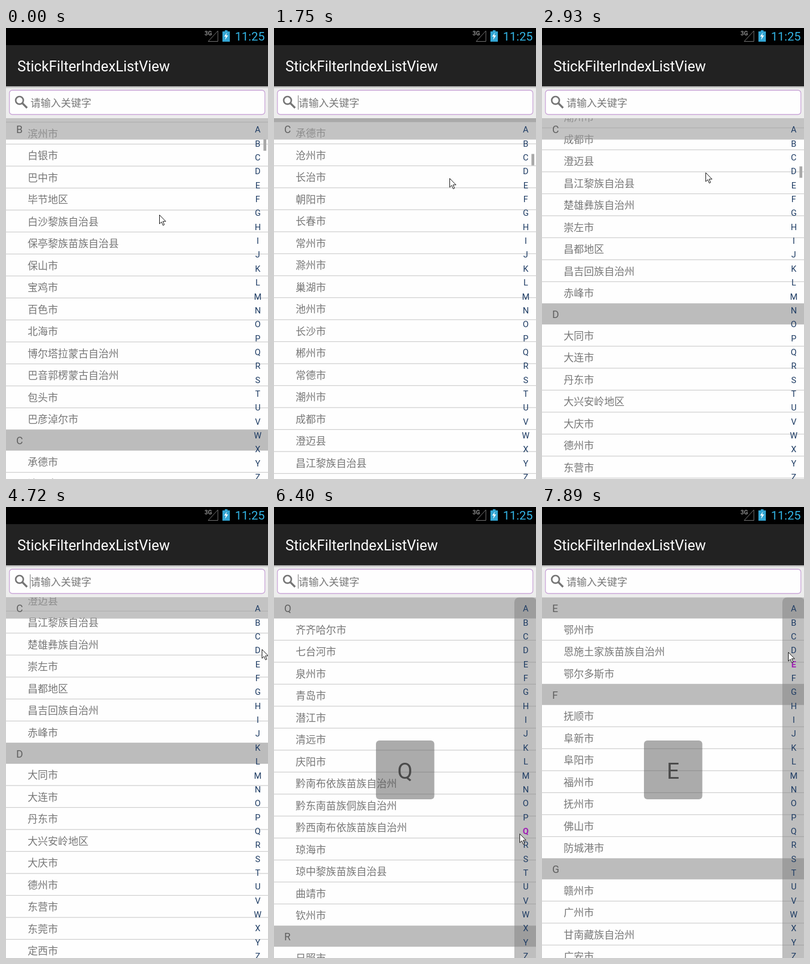
Recreate the animation shown at these times as an HTML page. Size 460 by 790 pixels, loop 8000 ms.

```html
<!DOCTYPE html>
<html lang="zh-CN">
<head>
<meta charset="utf-8">
<style>
html, body { margin: 0; width: 100%; height: 100%; overflow: hidden; background: #fefefe; }
svg { display: block; width: 460px; height: 790px; font-family: Roboto, "Noto Sans CJK SC", "Noto Sans CJK", sans-serif; }
.city { font: 17.8px "Noto Sans CJK SC", "Noto Sans CJK", sans-serif; fill: #777; }
.head { font-size: 18px; fill: #5f5f5f; }
.index { font-size: 15px; fill: #1d3b63; text-anchor: middle; }
.index .on { fill: #a01fb4; font-weight: 700; }
</style>
</head>
<body>
<svg viewBox="0 0 460 790">
  <defs>
    <linearGradient id="shade" x2="0" y2="1">
      <stop stop-color="#aaa"/><stop offset="1" stop-color="#ededed"/>
    </linearGradient>
    <clipPath id="listArea"><path d="M0 158H460V790H0z"/></clipPath>
  </defs>
  <rect width="460" height="790" fill="#fefefe"/>
  <g clip-path="url(#listArea)">
    <g id="list"></g>
    <g id="sticky">
      <rect y="158" width="460" height="37.5" fill="#9d9d9d" fill-opacity=".6"/>
      <text id="stickyText" class="head" x="18" y="184"></text>
    </g>
  </g>
  <rect id="thumb" x="452" width="5" height="20" fill="#aaa"/>
  <rect id="bar" x="422" y="158.5" width="39" height="650" rx="8" fill="#808080" fill-opacity=".5"/>
  <g id="index" class="index"></g>
  <g id="popup">
    <rect x="179" y="409" width="102.5" height="103" rx="6" fill="#5a5a5a" fill-opacity=".5"/>
    <text id="popupText" x="230" y="475.5" font-size="39" fill="#4a4a4a" text-anchor="middle"></text>
  </g>

  <rect width="460" height="30"/>
  <text x="348.500" y="13" font-size="10.500" font-weight="700" fill="#8a8a8a">3G</text>
  <path d="M372 5V23.500H355z" fill="none" stroke="#777"/>
  <path d="M384 4h5v2h4v18h-13V6h4z" fill="#33a5d3"/>
  <path d="M388 8l-5 7h3l-1.500 6 5.500-8h-3.500z" fill="#fff"/>
  <text x="402" y="22" font-size="21" fill="#33b5e5">11:25</text>
  <rect y="30" width="460" height="72" fill="#222"/>
  <text x="20" y="76" font-size="25.200" fill="#fff">StickFilterIndexListView</text>
  <rect y="102" width="460" height="56" fill="#ededed"/>
  <rect y="102" width="460" height="4" fill="url(#shade)"/>
  <rect x="6" y="109" width="448.500" height="42.500" rx="5" fill="#fefefe" stroke="#c8a3d6" stroke-width="1.300"/>
  <g fill="none" stroke="#757575">
    <circle cx="23.700" cy="126.700" r="6.700" stroke-width="2.700"/>
    <path d="M28.500 131.500L37 140" stroke-width="3.300"/>
  </g>
  <text class="city" x="43" y="137.500">请输入关键字</text>
  <path id="caret" d="M42.500 118V143" stroke="#777"/>
  <path id="mouse" d="M.5 .5V16L4 12.700 6.600 18.700 9 17.600 6.400 11.800H11.500z" fill="#fff" stroke="#111"/>
</svg>
<script>
const LOOP = 8000, TOP = 158, HEAD = 37, ROW = 38.5, CELL = 24.36;

// Names without a longer suffix get 市 appended.
const cities = {
  B: '保定 本溪 白山 白城 蚌埠 亳州 滨州 白银 巴中 毕节地区 白沙黎族自治县 保亭黎族苗族自治县 保山 宝鸡 百色 北海 博尔塔拉蒙古自治州 巴音郭楞蒙古自治州 包头 巴彦淖尔',
  C: '承德 沧州 长治 朝阳 长春 常州 滁州 巢湖 池州 长沙 郴州 常德 潮州 成都 澄迈县 昌江黎族自治县 楚雄彝族自治州 崇左 昌都地区 昌吉回族自治州 赤峰',
  D: '大同 大连 丹东 大兴安岭地区 大庆 德州 东营 东莞 定西 德阳 达州 东方 定安县 儋州 大理白族自治州 德宏傣族景颇族自治州 迪庆藏族自治州',
  E: '鄂州 恩施土家族苗族自治州 鄂尔多斯',
  F: '抚顺 阜新 阜阳 福州 抚州 佛山 防城港',
  G: '赣州 广州 甘南藏族自治州 广安 甘孜藏族自治州 广元 贵阳 果洛藏族自治州 桂林 贵港 固原 高雄',
  H: '邯郸 衡水 葫芦岛 哈尔滨 鹤岗 黑河 淮安 杭州 湖州 合肥 淮南 淮北 黄山 菏泽 鹤壁 黄石 黄冈 衡阳 怀化 惠州 河源 海口 汉中 河池 贺州 呼和浩特',
  J: '晋城 晋中 锦州 吉林 鸡西 佳木斯 嘉兴 金华 景德镇 九江 吉安 济南 济宁 焦作 济源 荆门 荆州 江门 揭阳 嘉峪关 金昌 酒泉 基隆 嘉义',
  K: '开封 昆明 克拉玛依 喀什地区',
  L: '廊坊 临汾 吕梁 辽阳 辽源 连云港 丽水 六安 龙岩 莱芜 临沂 聊城 洛阳 漯河 娄底 兰州 陇南 泸州 乐山 六盘水 丽江 临沧 柳州 来宾 拉萨',
  M: '牡丹江 马鞍山 茂名 梅州 绵阳 眉山',
  N: '南京 南通 宁波 南平 宁德 南昌 南阳 内江 南充 怒江傈僳族自治州 南宁 那曲地区',
  P: '盘锦 莆田 萍乡 平顶山 濮阳 平凉 攀枝花 普洱 屏东县 澎湖县',
  Q: '齐齐哈尔 七台河 泉州 青岛 潜江 清远 庆阳 黔南布依族苗族自治州 黔东南苗族侗族自治州 黔西南布依族苗族自治州 琼海 琼中黎族苗族自治县 曲靖 钦州',
  R: '日照 日喀则地区',
  S: '石家庄 朔州 沈阳 四平 松原 双鸭山 绥化 苏州 宿迁 绍兴 宿州 三明 上饶 三门峡 商丘 十堰 随州 邵阳 韶关 深圳 汕头 汕尾 遂宁 三亚 商洛',
  T: '唐山 太原 铁岭 通化 泰州 台州 铜陵 泰安 天门 天水 铜仁地区 屯昌县 铜川 吐鲁番地区 塔城地区 通辽 台北 台中 台南',
  W: '无锡 温州 芜湖 潍坊 威海 武汉 武威 万宁 文昌 渭南 梧州 吴忠 乌海',
  X: '邢台 忻州 徐州 宣城 厦门 新余 新乡 许昌 信阳 襄樊 孝感 咸宁 仙桃 湘潭'
};

const $ = id => document.getElementById(id);
function add(parent, tag, attrs, text = '') {
  const el = document.createElementNS('http://www.w3.org/2000/svg', tag);
  for (const k in attrs) el.setAttribute(k, attrs[k]);
  el.textContent = text;
  return parent.appendChild(el);
}

const sections = [];
let y = 0;
for (const [letter, names] of Object.entries(cities)) {
  sections.push({ letter, top: y });
  add($('list'), 'rect', { y, width: 460, height: HEAD, fill: '#bcbcbc' });
  add($('list'), 'text', { x: 18, y: y + 26, class: 'head' }, letter);
  y += HEAD;
  names.split(' ').forEach((name, i, all) => {
    const full = /自治|地区$|县$/.test(name) ? name : name + '市';
    add($('list'), 'text', { x: 38, y: y + 26.3, class: 'city' }, full);
    y += ROW;
    if (i < all.length - 1) add($('list'), 'rect', { y: y - 1, width: 460, height: 1.2, fill: '#cecece' });
  });
  y -= 1;
}
const topOf = letter => sections.find(s => s.letter === letter).top;

const letters = [...'ABCDEFGHIJKLMNOPQRSTUVWXYZ'];
const marks = letters.map((c, i) => add($('index'), 'text', { x: 442, y: 183.2 + i * CELL }, c));

// Screen refreshes: runs of even steps as [from, to, intervals].
const ticks = [0];
for (const [a, b, n] of [[150, 1060, 7], [1200, 1750, 4], [1750, 2140, 3], [2290, 2930, 5],
  [2930, 3210, 2], [3360, 4290, 7], [4440, 4720, 2], [4720, 5290, 4], [5290, 5440, 1],
  [5560, 6400, 6], [6400, 6550, 1], [6700, 6820, 1], [7380, 7890, 4]])
  for (let i = 0; i <= n; i++) ticks.push(a + (b - a) * i / n);

const path = [[0, 269, 327], [400, 285, 250], [1000, 290, 400], [1750, 308, 263], [2150, 298, 400],
  [2930, 287, 253], [3360, 290, 256], [3900, 440, 715], [4720, 449, 249], [4860, 449, 251],
  [5290, 449, 329], [6400, 431, 572], [6820, 432, 660], [7250, 432, 660], [7890, 432, 254]];
const drag = [[0, 0], [400, 150], [1000, 300], [1750, 575.5], [2150, 650], [2930, 1065.5], [3210, 1135]];
const PRESS = 4800, LAG = 40;
const start = topOf('C') - 545;

function at(keys, t, col = 1) {
  const i = keys.findIndex(k => k[0] > t);
  if (i < 0) return keys[keys.length - 1][col];
  if (i === 0) return keys[0][col];
  const a = keys[i - 1], b = keys[i];
  return a[col] + (b[col] - a[col]) * (t - a[0]) / (b[0] - a[0]);
}

const show = (id, on) => $(id).setAttribute('display', on ? 'inline' : 'none');

function render(now) {
  const t = ticks.filter(k => k <= now + 0.01).pop();
  const pressed = t >= PRESS;
  let scroll = start + at(drag, t), picked = -1;
  if (pressed) {
    picked = Math.floor((at(path, t - LAG, 2) - 165.8) / CELL);
    scroll = sections.filter(s => s.letter <= letters[picked]).pop().top;
  }
  $('list').setAttribute('transform', `translate(0 ${TOP + 0.3 - scroll})`);

  const cur = sections.filter(s => s.top <= scroll).pop();
  const next = sections.find(s => s.top > scroll);
  const push = next ? Math.min(0, next.top - scroll - HEAD) : 0;
  show('sticky', scroll > cur.top);
  $('sticky').setAttribute('transform', `translate(0 ${push})`);
  $('stickyText').textContent = cur.letter;

  $('thumb').setAttribute('y', 195 + at(drag, t) * 0.0445);
  $('thumb').setAttribute('opacity', pressed ? 0 : Math.max(0, Math.min(1, (3760 - t) / 250)));

  show('bar', pressed);
  show('popup', pressed);
  $('popupText').textContent = letters[picked] || '';
  marks.forEach((m, i) => m.setAttribute('class', i === picked ? 'on' : ''));

  const blink = t % 1000;
  show('caret', blink >= 310 && blink < 810);
  $('mouse').setAttribute('transform', `translate(${at(path, t)} ${at(path, t, 2)})`);
}

const begin = performance.now();
function loop() {
  render((performance.now() - begin) % LOOP);
  requestAnimationFrame(loop);
}
loop();
</script>
</body>
</html>
```
